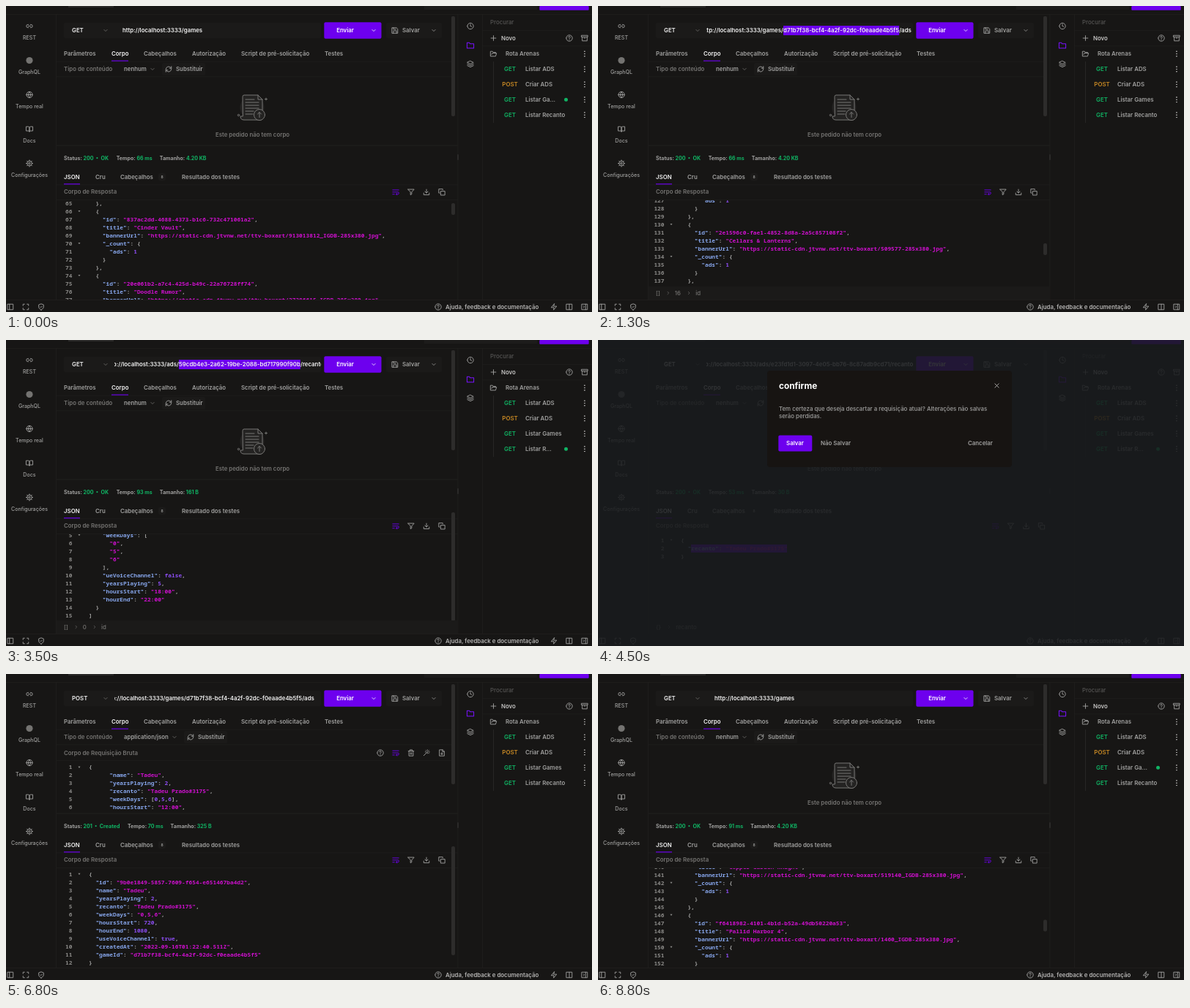
These frames come from a looping animation (800x419 px, 8900 ms). An HTML page:

```html
<!DOCTYPE html>
<html lang="pt">
<head>
<meta charset="utf-8">
<style>
html, body { margin: 0; width: 100%; height: 100%; overflow: hidden; background: #171615; }
svg { display: block; }
text { font: 600 7.85px Inter, sans-serif; white-space: pre; }
.small { font-size: 7.1px; font-weight: 700; }
.label { font-size: 7.1px; font-weight: 500; }
.mid { font-weight: 500; }
.title { font-size: 11.8px; font-weight: 700; }
.code { font: 600 7.85px "Noto Sans Mono", monospace; }
.c { text-anchor: middle; }
.r { text-anchor: end; }
</style>
</head>
<body>
<svg id="stage" width="800" height="419" viewBox="0 0 800 419"></svg>
<script>
const LOOP = 8900, LINE = 11, CH = 4.71;
const ACCENT = '#6d00ee', GREEN = '#10b464', GREY = '#a0a09f', DIM = '#747371', WHITE = '#f2f2f2', EDGE = '#21201f', FIELD = '#1b1a19';
const stage = document.getElementById('stage');
const pen = document.createElement('canvas').getContext('2d');

// ---------- drawing helpers ----------
const esc = s => String(s).replace(/&/g, '&amp;').replace(/</g, '&lt;');
const raw = (x, y, s, fill = GREY, cls = '') => `<text x="${x}" y="${y + 2.85}" fill="${fill}" class="${cls}">${s}</text>`;
const text = (x, y, s, fill, cls) => raw(x, y, esc(s), fill, cls);
const span = (s, fill) => `<tspan fill="${fill}">${s}</tspan>`;
const rect = (x, y, w, h, fill, r = 0) => `<rect x="${x}" y="${y}" width="${w}" height="${h}" fill="${fill}" rx="${r}"/>`;
const clip = (x, y, w, h, inner) => `<svg x="${x}" y="${y}" width="${w}" height="${h}" viewBox="${x} ${y} ${w} ${h}">${inner}</svg>`;
const ring = (x, y, r) => `M${x - r} ${y}a${r} ${r} 0 1 0 ${2 * r} 0a${r} ${r} 0 1 0 ${-2 * r} 0`;
const width = s => { pen.font = '600 7.85px Inter, sans-serif'; return pen.measureText(s).width; };

const box = 'M3 3h18v18H3z';
const icons = {
  link: 'M9 17H7A5 5 0 0 1 7 7h2M15 7h2a5 5 0 0 1 0 10h-2M8 12h8',
  globe: ring(12, 12, 10) + 'M2 12h20M12 2a15 15 0 0 1 0 20a15 15 0 0 1 0-20',
  book: 'M2 4h6a4 4 0 0 1 4 4v13a3 3 0 0 0-3-3H2zM22 4h-6a4 4 0 0 0-4 4v13a3 3 0 0 1 3-3h7z',
  gear: ring(12, 12, 3) + ring(12, 12, 8) + 'M12 1v3M12 20v3M1 12h3M20 12h3M4 4l2 2M18 18l2 2M4 20l2-2M18 6l2-2',
  clock: ring(12, 12, 10) + 'M12 6v6l4 2',
  folder: 'M2 4h7l2 3h11v13H2z',
  open: 'M6 14l2-4h14l-3 10H2V4h7l2 3h8v3',
  layers: 'M12 2l10 5-10 5L2 7zM2 12l10 5 10-5M2 17l10 5 10-5',
  plus: 'M12 4v16M4 12h16',
  help: ring(12, 12, 10) + 'M9 9a3 3 0 1 1 4 3q-1 .5-1 2M12 17v.5',
  archive: 'M2 3h20v5H2zM4 8v13h16V8M10 12h4',
  dots: ring(12, 4, 1) + ring(12, 12, 1) + ring(12, 20, 1),
  down: 'M6 9l6 6 6-6',
  right: 'M9 6l6 6-6 6',
  save: 'M3 3h14l4 4v14H3zM7 21v-8h10v8M7 3v5h8',
  refresh: 'M3 12a9 9 0 0 1 15-6l3 3M21 3v6h-6M21 12a9 9 0 0 1-15 6l-3-3M3 21v-6h6',
  wrap: 'M2 5h20M2 12h17a3.5 3.5 0 0 1 0 7h-5M16 16l-3 3 3 3M2 19h6',
  filter: 'M2 3h20l-8 9v7l-4 2v-9z',
  download: 'M21 15v6H3v-6M7 10l5 5 5-5M12 15V3',
  copy: 'M9 9h13v13H9zM5 15H2V2h13v3',
  trash: 'M3 6h18M5 6v16h14V6M8 6V2h8v4M10 11v6M14 11v6',
  wand: 'M3 21L16 8M15 4V2M15 14v-2M8 9h2M20 9h2M18 6l2-2M18 12l2 2M12 6l-2-2',
  file: 'M14 2H4v20h16V8zM14 2v6h6M12 11v7M9 15h6',
  close: 'M5 5l14 14M19 5L5 19',
  side: box + 'M9 3v18',
  expand: 'M3 8V3h5M16 3h5v5M21 16v5h-5M8 21H3v-5',
  shield: 'M12 22s8-4 8-10V5l-8-3-8 3v7c0 6 8 10 8 10zM9 12l2 2 4-4',
  zap: 'M13 2L3 14h9l-1 8 10-12h-9z',
  columns: box + 'M12 3v18',
  panel: box + 'M15 3v18M8 9l3 3-3 3'
};
const icon = (name, x, y, color = GREY, size = 10) =>
  `<path d="${icons[name]}" transform="translate(${x - size / 2} ${y - size / 2}) scale(${size / 24})" fill="none" stroke="${color}" stroke-width="2.2" stroke-linecap="round" stroke-linejoin="round"/>`;
const chevron = (x, y, color) => icon('down', x, y, color, 8.5);

// ---------- data ----------
function uuid(seed) {
  let n = seed * 7919 + 13;
  return '8-4-4-4-12'.replace(/\d+/g, len => Array.from({ length: +len }, () => {
    n = (n * 16807 + 11) % 2147483647;
    return (n >> 8 & 15).toString(16);
  }).join(''));
}
const GAME = 'd71b7f38-bcf4-4a2f-92dc-f0eaade4b5f5';
const GAME2 = '2e1596c0-fae1-4852-8d8a-2a5c857108f2';
const AD = 'e23fd1d1-3097-4e05-bb76-8c87adb9cd71';
const CONTACT = 'Tadeu Prado#3175';
const known = {
  8: ['Cinder Vault', '913013812_IGDB', '837ac2dd-4688-4373-b1c6-732c471061a2'],
  9: ['Doodle Rumor', '27386615_IGDB', '20e061b2-a7c4-425d-b49c-22a76728ff74'],
  16: ['Cellars & Lanterns', '509577', GAME2],
  17: ['Copper Garden Knight', '519140_IGDB', uuid(17)],
  18: ['Pallid Harbor 4', '1460_IGDB', 'f6418982-4101-4b1d-b52a-49db50220a53']
};
const first = ['Amber', 'Silent', 'Crooked', 'Velvet', 'Northern'], last = ['Orchard', 'Signal', 'Ferry', 'Meadow'];
const games = Array.from({ length: 21 }, (_, k) => {
  const [title, art, id] = known[k] || [first[k % 5] + ' ' + last[k % 4], 490000 + k * 1373 + '_IGDB', uuid(k)];
  return { id, title, bannerUrl: `https://static-cdn.jtvnw.net/ttv-boxart/${art}-285x380.jpg`, _count: { ads: 1 } };
});
const lines = v => JSON.stringify(v, null, 2).split('\n');
const replies = {
  games: lines(games),
  ads: lines([{ id: AD, name: 'Tadeu', weekDays: ['0', '5', '6'], ueVoiceChannel: false, yearsPlaying: 5, hoursStart: '18:00', hourEnd: '22:00' }]),
  contact: lines({ recanto: CONTACT }),
  created: lines({
    id: uuid(40), name: 'Tadeu', yearsPlaying: 2, recanto: CONTACT, weekDays: '0,5,6', hoursStart: 720,
    hourEnd: 1080, useVoiceChannel: true, createdAt: '2022-09-16T01:22:40.511Z', gameId: GAME
  })
};
const body = ['{', '      "name": "Tadeu",', '      "yearsPlaying": 2,', `      "recanto": "${CONTACT}",`,
  '      "weekDays": [0,5,6],', '      "hoursStart": "12:00",', '      "hourEnd": "18:00",'];

// ---------- timeline ----------
const HOST = 'http://localhost:3333/';
const OK = '200  •  OK';
const steps = [
  [0, { method: 'GET', pre: HOST + 'games', id: '', post: '', idX: 0, dot: 2, hover: -1, reply: 'games', status: OK, ms: 66, size: '4.20 KB', crumb: [] }],
  [900, { crumb: ['[]', '16', 'id'] }],
  [1000, { hover: 0 }],
  [1100, { pre: HOST + 'games/', id: GAME, post: '/ads', dot: -1 }],
  [1200, { idX: 253, sel: true, hover: -1 }],
  [1500, { id: GAME2, idX: 254, sel: false }],
  [1900, { reply: 'ads', ms: 93, size: '161 B', crumb: [] }],
  [2500, { crumb: ['[]', '0', 'id'] }],
  [2700, { hover: 3 }],
  [3300, { pre: HOST + 'ads/', id: uuid(31), post: '/recanto', idX: 0, dot: 3, hover: -1 }],
  [3500, { idX: 236, sel: true }],
  [3700, { id: AD, sel: false }],
  [3900, { reply: 'contact', ms: 53, size: '30 B', crumb: [] }],
  [4100, { mark: true, crumb: ['{}', 'recanto'] }],
  [4800, { method: 'POST', pre: HOST + 'games/', id: GAME, post: '/ads', idX: 0, dot: -1, mark: false }],
  [5500, { idX: 246, sel: true, auth: true }],
  [5700, { sel: false, auth: false, crumb: [] }],
  [6400, { reply: 'created', status: '201  •  Created', ms: 70, size: '325 B' }],
  [7200, { hover: 2 }],
  [7900, { method: 'GET', pre: HOST + 'games', id: '', post: '', idX: 0, dot: 2, hover: -1 }],
  [8200, { reply: 'games', status: OK, ms: 91, size: '4.20 KB' }]
];
// [start, end, from, to]: number of the line resting at the top
const scrolls = [[0, 800, 65, 127.36], [1900, 2000, .64, .64], [2100, 2500, .64, 5.27], [3900, 4000, .64, .64], [8300, 8800, .64, 140.55]];
const dialogs = [[2800, 3400], [4200, 4900], [7400, 8000]];

const stateAt = t => Object.assign({}, ...steps.filter(s => s[0] <= t).map(s => s[1]));
function scrollAt(t) {
  const [a, b, from, to] = scrolls.filter(s => s[0] <= t).pop();
  const p = Math.min(1, (t - a) / (b - a));
  return from + (to - from) * p * (2 - p);
}
const dialogAt = t => Math.max(0, ...dialogs.map(([a, b]) => Math.min(1, (t - a + 100) / 200, (b - t) / 200)));

// ---------- parts ----------
function codeLine(s, n, y) {
  const indent = s.search(/\S/);
  const tinted = esc(s.trim()).replace(/("[^"]*")(?=:)|("[^"]*")|\d+|true|false/g,
    (m, key, str) => span(m, key ? '#86a5ea' : str ? '#cc10cc' : '#8b4df0'));
  return text(90.5, y, n, '#8a8987', 'code r') + raw(113 + indent * CH, y, tinted, GREY, 'code') +
    (/[{[]$/.test(s) ? `<path d="M98.500 ${y - .8}h3l-1.500 2.400z" fill="#8a8987"/>` : '');
}
const code = (list, top) => list.map((s, i) => {
  const y = top + i * LINE;
  return y > 90 && y < 412 ? codeLine(s, i + 1, y) : '';
}).join('');

function sidebar() {
  return [['link', 'REST'], ['', 'GraphQL'], ['globe', 'Tempo real'], ['book', 'Docs'], ['gear', 'Configurações']].map(([name, label], i) => {
    const y = 27.5 + i * 47;
    return (name ? icon(name, 32, y) : `<circle cx="32" cy="${y}" r="4.600" fill="${DIM}"/>`) + text(32, y + 15.8, label, GREY, 'label c');
  }).join('');
}

function frame() {
  return rect(85, 0, 62, 2, '#2b2a29') + rect(571, 0, 154, 5, '#1d1c1b') + rect(728.3, 0, 67.4, 5.8, ACCENT, 1) +
    rect(0, 11, 800, .7, EDGE) + rect(68, 11, .8, 391, EDGE) + rect(616.5, 11, .8, 391, EDGE) + rect(650, 11, .8, 391, EDGE) +
    rect(69, 190.5, 548, 1, EDGE) + rect(0, 402, 800, .8, EDGE) + rect(616, 203, 2, 8, '#2b2a29', 1) + rect(608, 14, 5, 137, '#2d2c2b', 2) +
    icon('side', 6, 412) + icon('expand', 27, 412) + icon('shield', 48, 412) + icon('help', 590, 412) +
    text(600, 412, 'Ajuda, feedback e documentação', '#b4b3b2') + icon('zap', 748, 412) + icon('columns', 769, 412) + icon('panel', 790, 412);
}

function address(s) {
  const x = s.idX || 159 + width(s.pre), w = width(s.id);
  return rect(79, 23, 351, 21, FIELD, 2) + text(90, 33.5, s.method, WHITE) + chevron(136, 33.5, DIM) +
    clip(148, 23, 282, 21, (s.sel ? rect(x, 27, w, 13, ACCENT) : '') +
      text(x, 33.5, s.pre, WHITE, 'r') + text(x, 33.5, s.id + s.post, WHITE)) +
    rect(434.3, 22.3, 78.2, 22.4, ACCENT, 2) + text(463, 33.5, 'Enviar', '#fff', 'c') + chevron(502, 33.5, '#fff') +
    rect(519, 23, 76, 21, FIELD, 2) + icon('save', 531, 33.5) + text(541, 33.5, 'Salvar') + chevron(584, 33.5);
}

const emptyArt = `<g fill="#242322" stroke="#777674" stroke-width="1" stroke-linecap="round" stroke-linejoin="round">
  <circle cx="336" cy="139" r="16.500" stroke="none"/>
  <path d="M323 124q0-2 2-2h19l6 6v26q0 2-2 2h-23q-5 0-5-5h3z"/>
  <path d="M344 122v6h6M327 128h12M327 132h18M327 136h18M327 140h18M327 144h11M327 148h10" fill="none"/>
  <circle cx="346" cy="149" r="7.500"/><path d="M346 152.500v-7M343.500 148l2.500-2.500 2.500 2.500" fill="none"/>
  <circle cx="317.500" cy="149.500" r="1.200"/><path d="M355 126v3M353.500 127.500h3" fill="none"/></g>`;

function request(s) {
  const post = s.method === 'POST', dx = post ? 30 : 0;
  const tabs = [[79, 'Parâmetros'], [144, 'Corpo'], [188, 'Cabeçalhos'], [254, 'Autorização'], [321, 'Script de pré-solicitação'], [435, 'Testes']];
  const out = tabs.map(([x, label], i) => text(x, 65.5, label, i === 1 || (i === 3 && s.auth) ? WHITE : GREY)).join('') +
    rect(144, 74.5, 23, 1.3, ACCENT) + rect(69, 75.8, 539, .6, EDGE) + rect(69, 96.5, 539, .6, EDGE) +
    text(79, 86.5, 'Tipo de conteúdo', DIM) + text(161, 86.5, post ? 'application/json' : 'nenhum') + chevron(200 + dx, 86.5, DIM) +
    rect(213 + dx, 78, 59, 17, FIELD, 2) + icon('refresh', 222 + dx, 86.5) + text(232 + dx, 86.5, 'Substituir');
  if (!post) return out + emptyArt + text(336.5, 176, 'Este pedido não tem corpo', DIM, 'c');
  return out + text(79, 108.5, 'Corpo de Requisição Bruta', DIM) + rect(69, 118, 539, .6, EDGE) +
    ['help', 'wrap', 'trash', 'wand', 'file'].map((n, i) => icon(n, 511 + i * 21, 108, n === 'wrap' ? ACCENT : GREY)).join('') +
    clip(69, 119, 539, 69, code(body, 127.3));
}

function response(s, scroll) {
  const list = replies[s.reply], short = s.reply === 'contact', crumb = s.crumb.length > 0;
  const part = (label, value, dx) => `<tspan dx="${dx}">${label}: </tspan>` + span(value, GREEN);
  let out = raw(79, 208, part('Status', s.status, 0) + part('Tempo', s.ms + ' ms', 10.5) + part('Tamanho', s.size, 10.5), GREY, 'small') +
    text(79, 234, 'JSON', WHITE) + text(122, 234, 'Cru') + text(156, 234, 'Cabeçalhos') + rect(208, 229, 10, 10, '#1c1b1a', 2) +
    `<text x="213" y="236" fill="${GREY}" class="c" style="font-size:5px">8</text>` + text(240, 234, 'Resultado dos testes') +
    rect(79, 243.2, 22, 1.4, ACCENT) + rect(69, 244.6, 548, .6, EDGE) + text(79, 254.5, 'Corpo de Resposta', DIM) + rect(69, 265, 548, .6, EDGE) +
    ['wrap', 'filter', 'download', 'copy'].map((n, i) => icon(n, (short ? 542.5 : 532) + i * 21, 254.8, i ? GREY : ACCENT)).join('');
  if (!short) {
    out += s.reply === 'games' ? rect(608, 270 + (scroll - 65) * .88, 5, 16, '#2d2c2b', 2) : rect(608, 236, 5, 149, '#2d2c2b', 2);
  }
  out += clip(69, 266, 539, crumb ? 118 : 136,
    (s.mark ? rect(127, 280, 131, 11, ACCENT) : '') + code(list, 269.7 + (1 - scroll) * LINE));
  if (crumb) {
    let x = 79;
    out += rect(69, 384, 548, 18, '#1b1a19') + s.crumb.map((c, i) => {
      const item = (i ? icon('right', x - 9, 393, DIM, 7) : '') + text(x, 393, c, DIM, 'mid');
      x += width(c) + 20;
      return item;
    }).join('');
  }
  return out;
}

const rows = [['GET', 'Listar ADS'], ['POST', 'Criar ADS'], ['GET', 'Listar Games', 'Listar Ga...'], ['GET', 'Listar Recanto', 'Listar R...']];
function collections(s) {
  return icon('clock', 634, 27.5) + icon('folder', 634, 54, '#7a12ff', 11) + icon('layers', 634, 79.5) +
    text(661, 22, 'Procurar', '#555453', 'mid') + rect(651, 33, 149, .6, EDGE) + rect(651, 54.5, 149, .6, EDGE) +
    icon('plus', 665.5, 44) + text(676, 44, 'Novo', '#c4c3c2') + icon('help', 769, 44) + icon('archive', 790, 44) +
    icon('open', 665.5, 65.5) + text(682, 65.5, 'Rota Arenas') + icon('dots', 790, 65.5, '#c4c3c2') + rect(665, 76, .8, 84, '#2c2b2a') +
    rows.map(([method, label, cut], i) => {
      const y = 86.5 + i * 20.9, lit = s.hover === i;
      return text(688, y, method, method === 'GET' ? GREEN : '#c98a24', 'c') + text(709, y, s.dot === i ? cut : label, lit ? WHITE : GREY) +
        (s.dot === i ? `<circle cx="764.500" cy="${y}" r="2.500" fill="${GREEN}"/>` : '') + icon('dots', 790, y, lit ? WHITE : '#c4c3c2');
    }).join('');
}

function dialog(alpha) {
  return `<g opacity="${alpha}">` + rect(0, 0, 800, 419, 'rgba(25,27,29,.88)') + rect(231, 42, 334, 132, '#171412', 4) +
    `<text x="247" y="66.700" fill="#fff" class="title">confirme</text>` + icon('close', 544.5, 62.5, '#c4c3c2', 9) +
    text(247, 94, 'Tem certeza que deseja descartar a requisição atual? Alterações não salvas', GREY, 'mid') +
    text(247, 104.5, 'serão perdidas.', GREY, 'mid') +
    rect(246.3, 130.5, 46, 22, ACCENT, 2) + text(269, 141, 'Salvar', '#fff', 'c') + text(304, 141, 'Não Salvar') + text(505, 141, 'Cancelar') + '</g>';
}

// ---------- loop ----------
const start = performance.now();
let shown = -1;
function tick() {
  const t = Math.floor((performance.now() - start) % LOOP / 100) * 100;
  if (t !== shown) {
    shown = t;
    const s = stateAt(t), alpha = dialogAt(t);
    stage.innerHTML = rect(0, 0, 800, 419, '#171615') + frame() + sidebar() + address(s) + request(s) +
      response(s, scrollAt(t)) + collections(s) + (alpha ? dialog(alpha) : '');
  }
  requestAnimationFrame(tick);
}
tick();
</script>
</body>
</html>
```
